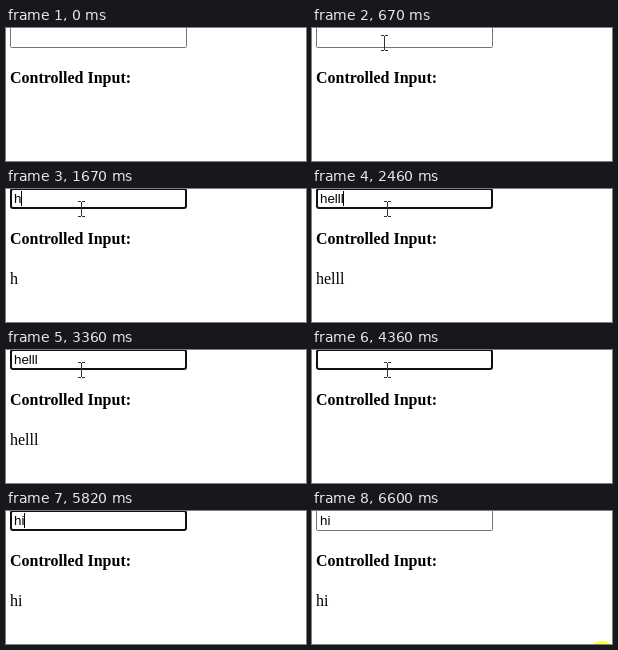
Write an HTML page with a canvas that moves like this. It is 300x133 px and loops after 6720 ms.

```html
<!DOCTYPE html>
<html lang="en">
<head>
<meta charset="utf-8">
<title>Controlled input</title>
<style>
  html, body { margin: 0; width: 100%; height: 100%; overflow: hidden; background: #fff; }
  canvas { display: block; }
</style>
</head>
<body>
<canvas id="stage" width="300" height="133"></canvas>
<script>
const ctx = document.getElementById('stage').getContext('2d', { alpha: false });
const LOOP = 6720;
const FOCUS = 770, BLUR = 6600;
const SANS = '13.333px "Liberation Sans", Arial, sans-serif';
const SERIF = '16px "Liberation Serif", "Times New Roman", serif';

// Each track holds [start ms, value]; a value stays until the next one.
const typed = [
  [0, ''], [1670, 'h'], [1790, 'he'], [2010, 'hel'], [2240, 'hell'], [2460, 'helll'],
  [2790, 'helllo'], [3360, 'helll'], [3810, 'hel'], [3910, ''], [4700, 'h'], [4820, 'hi']
];
const caret = [
  [0, false], [FOCUS, true], [1340, false], [1670, true], [3360, false], [3810, true],
  [4360, false], [4700, true], [5370, false], [5820, true], [6390, false]
];
const pointer = [
  [0, null], [110, ['arrow', 122, 98]], [220, ['arrow', 112, 82]], [330, ['arrow', 98, 62]],
  [440, ['arrow', 86, 38]], [550, ['beam', 76, 17]], [670, ['beam', 72, 15]],
  [770, ['beam', 70, 14]], [890, ['beam', 72, 16]], [1010, ['beam', 75, 20]],
  [5600, ['beam', 112, 14]], [5710, ['beam', 169, 5]], [5820, null]
];
const click = [
  [0, null], [FOCUS, [70, 13.5]], [890, null], [BLUR, [290, 142]]
];

function at(track, t) {
  let value = track[0][1];
  for (const [start, v] of track) if (start <= t) value = v;
  return value;
}

function text(str, x, y, font) {
  ctx.font = font;
  ctx.fillStyle = '#000';
  ctx.fillText(str, x, y);
}

// The top of the field lies just above the stage.
function drawField(focused) {
  ctx.beginPath();
  if (focused) {
    ctx.roundRect(5, 0, 175, 19, 2);
    ctx.lineWidth = 2;
    ctx.strokeStyle = '#101010';
  } else {
    ctx.roundRect(4.5, -1.5, 176, 21, 1);
    ctx.lineWidth = 1;
    ctx.strokeStyle = '#767676';
  }
  ctx.stroke();
}

function drawBeam(x, y) {
  ctx.fillStyle = '#333';
  ctx.fillRect(x, y - 7, 1, 14);
  for (const edge of [y - 8, y + 7]) {
    ctx.fillRect(x - 3, edge, 3, 1);
    ctx.fillRect(x + 1, edge, 3, 1);
  }
}

function drawArrow(x, y) {
  ctx.save();
  ctx.translate(x + 0.5, y + 0.5);
  ctx.fillStyle = '#fff';
  ctx.strokeStyle = '#000';
  ctx.lineWidth = 1;
  const outline = new Path2D('M0 0V15L3.5 12L6 17L8 16L6 11H10.5Z');
  ctx.fill(outline);
  ctx.stroke(outline);
  ctx.restore();
}

function drawClick(x, y) {
  ctx.save();
  ctx.globalCompositeOperation = 'multiply';
  ctx.fillStyle = '#ffff4c';
  ctx.beginPath();
  ctx.arc(x, y, 12.3, 0, Math.PI * 2);
  ctx.fill();
  ctx.restore();
}

function draw(t) {
  const value = at(typed, t);
  const mouse = at(pointer, t);
  const spot = at(click, t);

  ctx.fillStyle = '#fff';
  ctx.fillRect(0, 0, 300, 133);
  drawField(t >= FOCUS && t < BLUR);
  text(value, 8, 14, SANS);
  if (at(caret, t)) ctx.fillRect(Math.floor(8 + ctx.measureText(value).width), 2, 1, 15);
  text('Controlled Input:', 4, 55, 'bold ' + SERIF);
  text(value, 4, 95, SERIF);

  if (spot) drawClick(...spot);
  if (mouse) {
    const [kind, x, y] = mouse;
    (kind === 'beam' ? drawBeam : drawArrow)(x, y);
  }
}

const begin = performance.now();
function tick() {
  draw((performance.now() - begin) % LOOP);
  requestAnimationFrame(tick);
}
tick();
</script>
</body>
</html>
```
